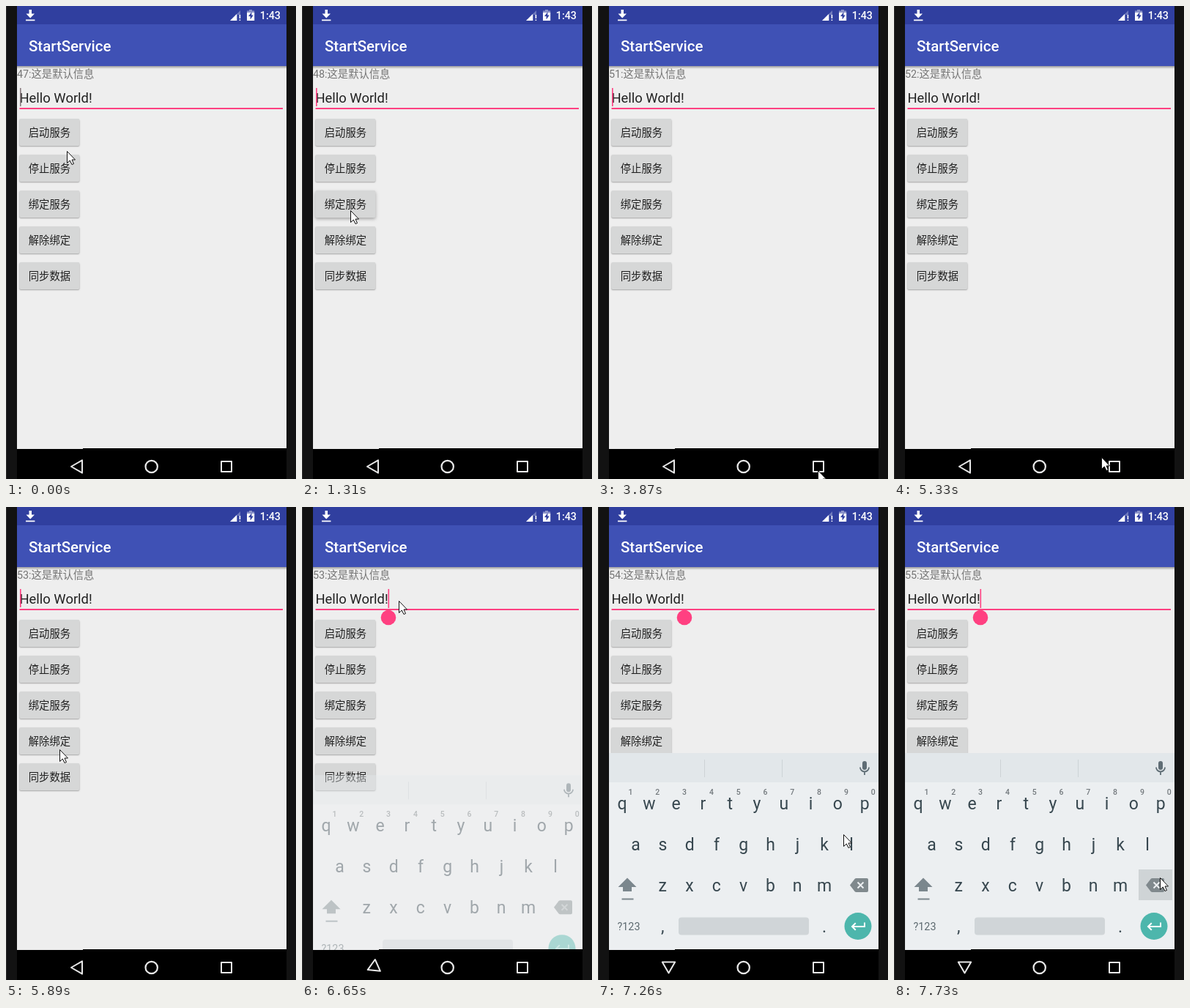
Animation of 396x646 px, one loop 8000 ms. Source, as an HTML page with a canvas:

```html
<!DOCTYPE html>
<html lang="zh-CN">
<head>
<meta charset="utf-8">
<style>
html, body { margin: 0; width: 100%; height: 100%; overflow: hidden; background: #121212; }
canvas { display: block; }
</style>
</head>
<body>
<canvas id="stage" width="396" height="646"></canvas>
<script>
const g = document.getElementById('stage').getContext('2d');
const LOOP = 8000, PINK = '#ff4081';
const FAMILY = 'Roboto, "Noto Sans CJK SC", "Noto Sans CJK", sans-serif';

const BUTTONS = ['启动服务', '停止服务', '绑定服务', '解除绑定', '同步数据'];
const COUNTS = [800, 1840, 2790, 3790, 4790, 5830, 6800, 7730];
// pointer path: time, x, y
const PATH = [
  [0, 83, 198], [69, 83, 198], [70, 76, 184], [290, 76, 184], [370, 72, 190],
  [560, 72, 190], [830, 66, 283], [1000, 66, 279], [3130, 66, 279], [3640, 300, 634],
  [4240, 300, 634], [4260, 300, 638], [5290, 300, 638], [5850, 73, 331], [5900, 73, 331],
  [6100, 90, 212], [6330, 132, 128], [6810, 132, 128], [7340, 370, 503], [7400, 370, 503],
  [7410, 368, 527], [7560, 368, 527], [7730, 363, 506], [LOOP, 363, 506]
];

const ramp = (t, a, b) => Math.min(1, Math.max(0, (t - a) / (b - a)));
const easeOut = p => 1 - (1 - p) * (1 - p);

function rect(x, y, w, h, color, r = 0) {
  g.fillStyle = color;
  g.beginPath();
  g.roundRect(x, y, w, h, r);
  g.fill();
}

function text(s, x, y, size, color, align = 'left', weight = 400) {
  g.font = `${weight} ${size}px ${FAMILY}`;
  g.textAlign = align;
  g.fillStyle = color;
  g.fillText(s, x, y);
}

function shape(d, fill, stroke, width = 1) {
  const p = new Path2D(d);
  if (fill) { g.fillStyle = fill; g.fill(p); }
  if (stroke) { g.strokeStyle = stroke; g.lineWidth = width; g.stroke(p); }
}

function disc(x, y, r, fill, stroke, width) {
  g.beginPath();
  g.arc(x, y, r, 0, Math.PI * 2);
  if (fill) { g.fillStyle = fill; g.fill(); }
  if (stroke) { g.strokeStyle = stroke; g.lineWidth = width; g.stroke(); }
}

function bars() {
  const shade = g.createLinearGradient(0, 82, 0, 86);
  shade.addColorStop(0, 'rgba(0,0,0,.34)');
  shade.addColorStop(1, 'rgba(0,0,0,0)');
  rect(15, 82, 368, 4, shade);
  rect(15, 0, 368, 25, '#303f9f');
  rect(15, 25, 368, 57, '#3f51b5');
  text('StartService', 31, 62, 20.44, '#fff', 'left', 500);
  text('1:43', 375, 18, 14.3, '#fff', 'right', 500);
  // download, signal, battery
  shape('M31.500 5h3.500v5.500h4L33.200 16.500 27.500 10.500h4zM27 18.500h12.400v1.800H27z', '#fff');
  shape('M306 20L320 6v6h-4v8z', 'rgba(255,255,255,.3)');
  shape('M306 20L315 11V20z', '#fff');
  shape('M318.6 12h1.6v5h-1.6zM318.6 18.4h1.6V20h-1.6z', '#fff');
  shape('M329 6.5h3V5h4v1.5h3.2V10H329z', 'rgba(255,255,255,.45)');
  rect(329, 9, 10.2, 11, '#fff');
  shape('M335.5 8l-4.5 6h2.6v4.5l4.2-6h-2.5z', '#303f9f');
}

function button(label, i, lift) {
  const y = 154 + i * 49;
  g.save();
  g.shadowColor = 'rgba(0,0,0,.3)';
  g.shadowBlur = 1.6 + 3 * lift;
  g.shadowOffsetY = 1 + lift;
  rect(18.2, y, 82.2, 37, '#d6d7d7', 2);
  g.restore();
  text(label, 59.4, y + 24, 14.3, '#1f1f1f', 'center');
}

function caret(t) {
  if (t >= 6560) {
    if (t < 7140 || t >= 7640) rect(117.5, 112, 1.6, 26, PINK);
    return;
  }
  const phase = (t + 170) % 1000;
  if (phase < 500) {
    rect(19, 112, 1.6, 25, t < 330 ? '#8a7c80' : PINK);
  } else if ((t >= 2330 && t < 2830) || (t >= 4330 && t < 4830)) {
    rect(19, 112, 1.6, 6, PINK);
    rect(19, 132, 1.6, 5, PINK);
  }
}

function content(t) {
  const count = 47 + COUNTS.filter(c => t >= c).length;
  rect(15, 82, 368, 523, '#eee');
  text(count + ':这是默认信息', 15, 98, 14.3, '#757575');
  text('Hello World!', 18.5, 132, 18.4, '#212121');
  rect(18.5, 139, 359.5, 2, PINK);
  caret(t);
  const lift = ramp(t, 1000, 1150) - ramp(t, 1450, 1620);
  BUTTONS.forEach((s, i) => button(s, i, i === 2 ? lift : 0));
  if (t >= 6560) {
    disc(118, 151, 10.3, PINK);
    shape('M118 139.5l8 5.5h-16z', PINK);
  }
}

function letters(row, x, y) {
  [...row].forEach((c, i) => text(c, x + i * 36.8, y, 23, '#37474f', 'center'));
}

function keyboard(t) {
  const p = easeOut(ramp(t, 6590, 6840));
  if (!p) return;
  g.save();
  g.beginPath();
  g.rect(15, 82, 368, 523);
  g.clip();
  g.globalAlpha = p;
  g.translate(0, (1 - easeOut(ramp(t, 6590, 6800))) * 60);
  rect(15, 336, 368, 40, '#e2e7ea');
  rect(15, 376, 368, 229, '#eceff1');
  rect(145, 345, 1, 24, '#cdd3d6');
  rect(251, 345, 1, 24, '#cdd3d6');
  // microphone
  rect(361, 347, 6, 12, '#5f6d75', 3);
  shape('M358 355.5a6 6 0 0 0 12 0M364 361.5v4.5', null, '#5f6d75', 1.8);

  letters('qwertyuiop', 33, 413);
  letters('asdfghjkl', 51.6, 469);
  letters('zxcvbnm', 88.2, 525);
  letters(',', 88.2, 581);
  letters('.', 309, 581);
  [...'1234567890'].forEach((c, i) => text(c, 44.5 + i * 36.8, 393, 10.5, '#73797d', 'center', 500));
  text('?123', 42, 578, 14.3, '#5c696f', 'center');

  // shift, delete, space, enter
  shape('M40 506.5L52.5 519H46v6H34v-6h-6.5z', '#7b878d');
  rect(32.5, 534.5, 16, 2, '#7b878d');
  if (t >= 7650) rect(334, 495, 46, 42, '#cfd4d6');
  shape('M344 516.5l6.5-8.5q1-1 2-1H367q2 0 2 2v15q0 2-2 2H352.5q-1 0-2-1z', '#80898d');
  shape('M354.5 512.5l8 8m0-8l-8 8', null, '#eceff1', 2);
  rect(110, 560.5, 178, 24, '#d0d5d8', 4);
  disc(355, 572.5, 18.5, '#4db6ac');
  shape('M364 567.5v5.5H347m4.8-4.8L347 573l4.8 4.8', null, '#fff', 2);
  g.restore();
}

function navBar(t) {
  rect(15, 605, 368, 41, '#000');
  rect(105, 604, 278, 1, '#000');
  g.lineJoin = 'round';
  g.save();
  g.translate(96.5, 629);
  g.rotate(-Math.PI / 2 * ramp(t, 6600, 6790));
  shape('M-7.5 0L7.5-8.7V8.7z', null, '#e8e8e8', 2);
  g.restore();
  disc(198.7, 629, 8.2, null, '#e8e8e8', 2.2);
  shape('M294 622h14v14h-14z', null, '#e8e8e8', 2);
  g.lineJoin = 'miter';
}

function pointer(t) {
  const k = PATH.findIndex(p => p[0] > t);
  const [t0, x0, y0] = PATH[k - 1], [t1, x1, y1] = PATH[k];
  const p = ramp(t, t0, t1);
  g.save();
  g.translate(Math.round(x0 + (x1 - x0) * p), Math.round(y0 + (y1 - y0) * p));
  shape('M.5.5V16.5L4.3 13 7 18.5 9.5 17.5 7 12H11.5z', '#fff', '#111', 1);
  g.restore();
}

function draw() {
  const t = performance.now() % LOOP;
  rect(0, 0, 396, 646, '#121212');
  rect(0, 0, 1, 646, '#2b2b2b');
  content(t);
  bars();
  keyboard(t);
  navBar(t);
  pointer(t);
  requestAnimationFrame(draw);
}
draw();
</script>
</body>
</html>
```
